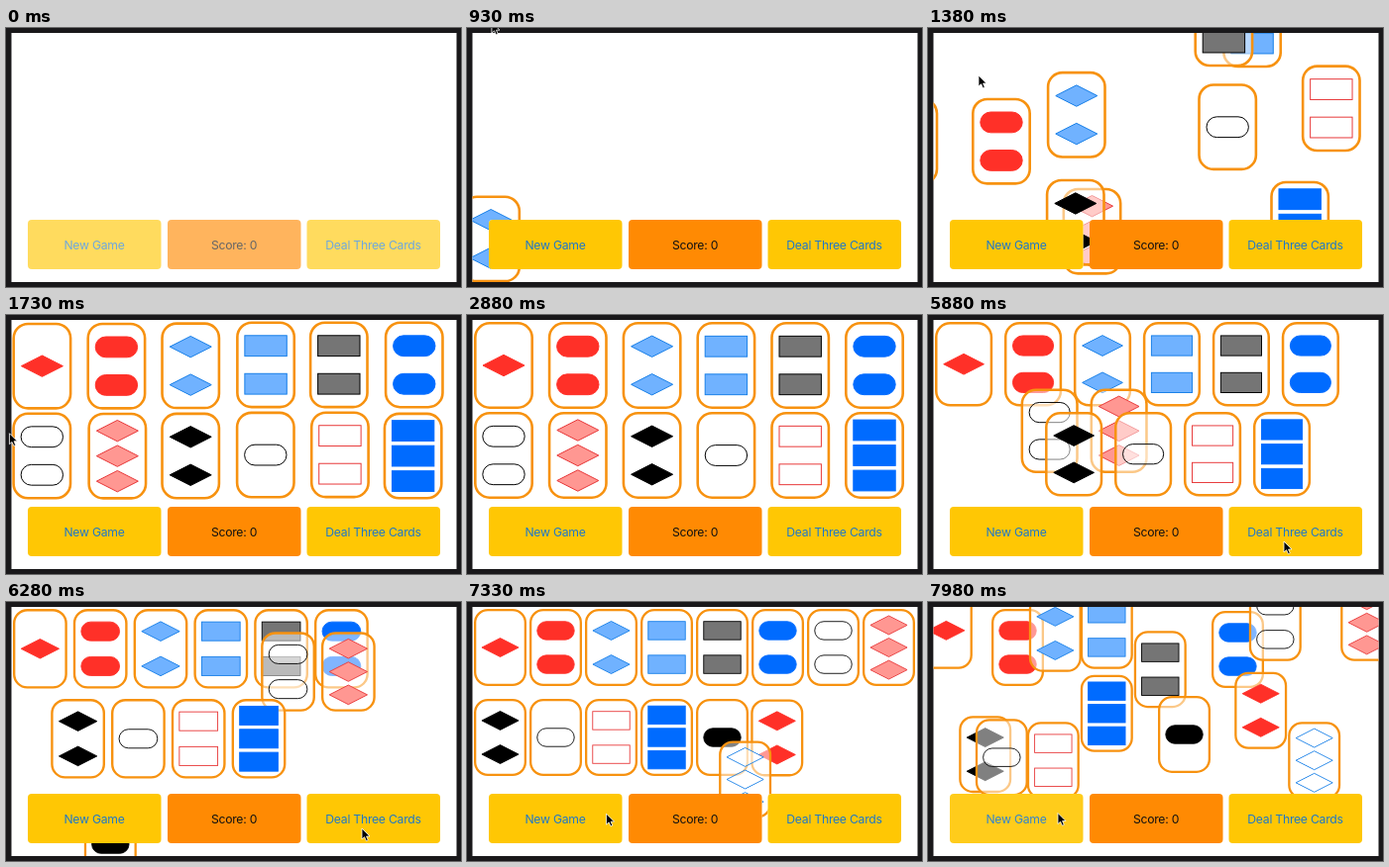
Recreate the animation shown at these times as an HTML page. Size 459x262 px, loop 8000 ms.

```html
<!DOCTYPE html>
<html lang="en">
<head>
<meta charset="utf-8">
<title>Card game</title>
<style>
  html, body { margin: 0; width: 100%; height: 100%; overflow: hidden; background: #19181a; }
  svg { display: block; width: 100vw; height: 100vh; }
  text { font: 12.2px Inter, "Open Sans", sans-serif; text-anchor: middle; letter-spacing: -.25px; }
</style>
</head>
<body>
<svg id="stage" viewBox="0 0 459 262">
  <defs><clipPath id="screen"><rect x="5.5" y="5" width="449" height="252"/></clipPath></defs>
  <rect width="459" height="262" fill="#19181a"/>
  <rect x="5.5" y="5" width="449" height="252" fill="#fff"/>
  <g clip-path="url(#screen)"><g id="cards"></g><g id="buttons"></g></g>
  <path id="cursor" d="M0 0V11L2.6 8.7 4.4 12.7 6.3 11.9 4.6 8H8Z" fill="#000" stroke="#fff" stroke-width=".8"/>
</svg>
<script>
const LOOP = 8000;
const COLORS = {
  red: ['#ff3028', '#ff9792', '#e8393a'],
  blue: ['#006bff', '#70b2ff', '#177fe8'],
  black: ['#000', '#757575', '#000']
};

// shape, count, color, filling, offset while arriving, offset while leaving
const DECK = [
  ['diamond', 1, 'red', 'solid', [-57, 64], [-15, -17]],
  ['oval', 2, 'red', 'solid', [-38, 64], [1, 0]],
  ['diamond', 2, 'blue', 'tint', [-37, 37], [-17, -14]],
  ['rect', 2, 'blue', 'tint', [66, -55], [-21, -17]],
  ['rect', 2, 'black', 'tint', [-38, -56], [-23, 22]],
  ['oval', 2, 'blue', 'solid', [76, -50], [-1, 2]],
  ['oval', 2, 'black', 'open', [-68, 50], [-19, -25]],
  ['diamond', 3, 'red', 'tint', [54, 64], [17, -25]],
  ['diamond', 2, 'black', 'solid', [-38, 55], [24, 17]],
  ['oval', 1, 'black', 'open', [41, -42], [-15, 20]],
  ['rect', 2, 'red', 'open', [71, -61], [-19, 23]],
  ['rect', 3, 'blue', 'solid', [-36, 57], [-21, -24]],
  ['oval', 1, 'black', 'solid', null, [1, -3]],
  ['diamond', 2, 'red', 'solid', null, [22, -27]],
  ['diamond', 3, 'blue', 'open', null, [20, 23]]
];

const $ = id => document.getElementById(id);
const clamp = v => Math.min(1, Math.max(0, v));
const mix = (a, b, p) => a + (b - a) * p;

function add(parent, tag, attrs) {
  const el = document.createElementNS('http://www.w3.org/2000/svg', tag);
  for (const key in attrs) el.setAttribute(key, attrs[key]);
  return parent.appendChild(el);
}

// cubic-bezier(.42, 0, .58, 1)
function ease(x) {
  x = clamp(x);
  let lo = 0, hi = 1;
  for (let i = 0; i < 24; i++) {
    const s = (lo + hi) / 2, r = 1 - s;
    if (1.26 * s * r * r + 1.74 * s * s * r + s * s * s < x) lo = s; else hi = s;
  }
  return lo * lo * (3 - 2 * lo);
}
const tween = (t, start, duration) => ease((t - start) / duration);

function drawSymbol(parent, shape, cy, paint) {
  if (shape === 'diamond') {
    add(parent, 'path', { d: `M9 ${cy}L30 ${cy - 10.7} 51 ${cy} 30 ${cy + 10.7}Z`, ...paint });
  } else {
    add(parent, 'rect', { x: 8.8, y: cy - 10.4, width: 42.4, height: 20.8, rx: shape === 'oval' ? 10.4 : 0, ...paint });
  }
}

function makeCard([shape, count, color, filling]) {
  const g = add($('cards'), 'g', {});
  add(g, 'rect', {
    x: 1.3, y: 1.3, width: 57.4, height: 85.4, rx: 14.5,
    fill: '#fff', 'fill-opacity': .5, stroke: '#f79210', 'stroke-width': 2.6
  });
  const [solid, tint, line] = COLORS[color];
  const paint = {
    fill: { solid, tint, open: '#fff' }[filling],
    'fill-opacity': filling === 'open' ? .4 : 1,
    stroke: filling === 'solid' ? solid : line,
    'stroke-width': 1
  };
  const gap = count === 2 ? 38.5 : 25.5;
  for (let i = 0; i < count; i++) drawSymbol(g, shape, 44 + (i - (count - 1) / 2) * gap, paint);
  return g;
}

function makeButton(x, label, fill, ink) {
  const g = add($('buttons'), 'g', {});
  add(g, 'rect', { x, y: 194, width: 134.5, height: 50, rx: 4, fill: '#fff' });
  const face = add(g, 'g', {});
  add(face, 'rect', { x, y: 194, width: 134.5, height: 50, rx: 4, fill });
  add(face, 'text', { x: x + 67, y: 223.5, fill: ink }).textContent = label;
  return face;
}

const cards = DECK.map(makeCard);
const buttons = [
  makeButton(22, 'New Game', '#ffc704', '#1f78c8'),
  makeButton(163, 'Score: 0', '#ff8a03', '#111'),
  makeButton(303.5, 'Deal Three Cards', '#ffc704', '#1f78c8')
];

const slot = (i, columns, pitch) => [7 + (i % columns) * pitch, 7 + 91 * Math.floor(i / columns)];

const arrive = t => tween(t, 172, 1600);
const leave = t => tween(t, 7755, 1500);
const ARRIVE_REST = 1 - arrive(1380);
const LEAVE_PART = leave(7980);

function placeCard(i, t) {
  const [, , , , from, to] = DECK[i];
  const regroup = tween(t, 5410, 1340);
  const target = slot(i, 8, 56);
  const entering = i > 11;
  const start = entering ? [0, 262] : slot(i, 6, 74.8);
  const p = entering ? tween(t, 5794 + (i - 12) * 380, 1200) : regroup;
  const away = from ? (1 - arrive(t)) / ARRIVE_REST : 0;
  const out = leave(t) / LEAVE_PART;
  const [x, y] = [0, 1].map(k =>
    mix(start[k], target[k], p) + (from ? from[k] * away : 0) + to[k] * out);
  const size = entering ? 1 : regroup;
  cards[i].setAttribute('transform',
    `translate(${x} ${y}) scale(${mix(60, 53, size) / 60} ${mix(88, 78, size) / 88})`);
}

// time, x, y
const POINTER = [
  [780, 21, -14], [1380, 51, 48], [1900, -10, 140], [3450, -10, 140],
  [4780, 359, 229], [6330, 359, 229], [7500, 131, 213.5], [LOOP, 131, 213.5]
];

function placePointer(t) {
  let i = POINTER.findIndex(([time]) => time > t);
  if (i < 0) i = POINTER.length - 1;
  const b = POINTER[i], a = POINTER[Math.max(0, i - 1)];
  const p = a === b ? 0 : ease((t - a[0]) / (b[0] - a[0]));
  $('cursor').setAttribute('transform', `translate(${mix(a[1], b[1], p)} ${mix(a[2], b[2], p)})`);
}

function tapFade(t, at) {
  return t < at ? 1 : mix(.5, 1, clamp((t - at) / 310));
}

function render(t) {
  cards.forEach((_, i) => placeCard(i, t));
  placePointer(t);
  const intro = mix(.64, 1, clamp((t - 10) / 220));
  buttons[0].setAttribute('opacity', intro * tapFade(t, 7730));
  buttons[1].setAttribute('opacity', intro);
  buttons[2].setAttribute('opacity', intro * tapFade(t, 5330));
}

const origin = performance.now();
function frame() {
  render((performance.now() - origin) % LOOP);
  requestAnimationFrame(frame);
}
frame();
</script>
</body>
</html>
```
